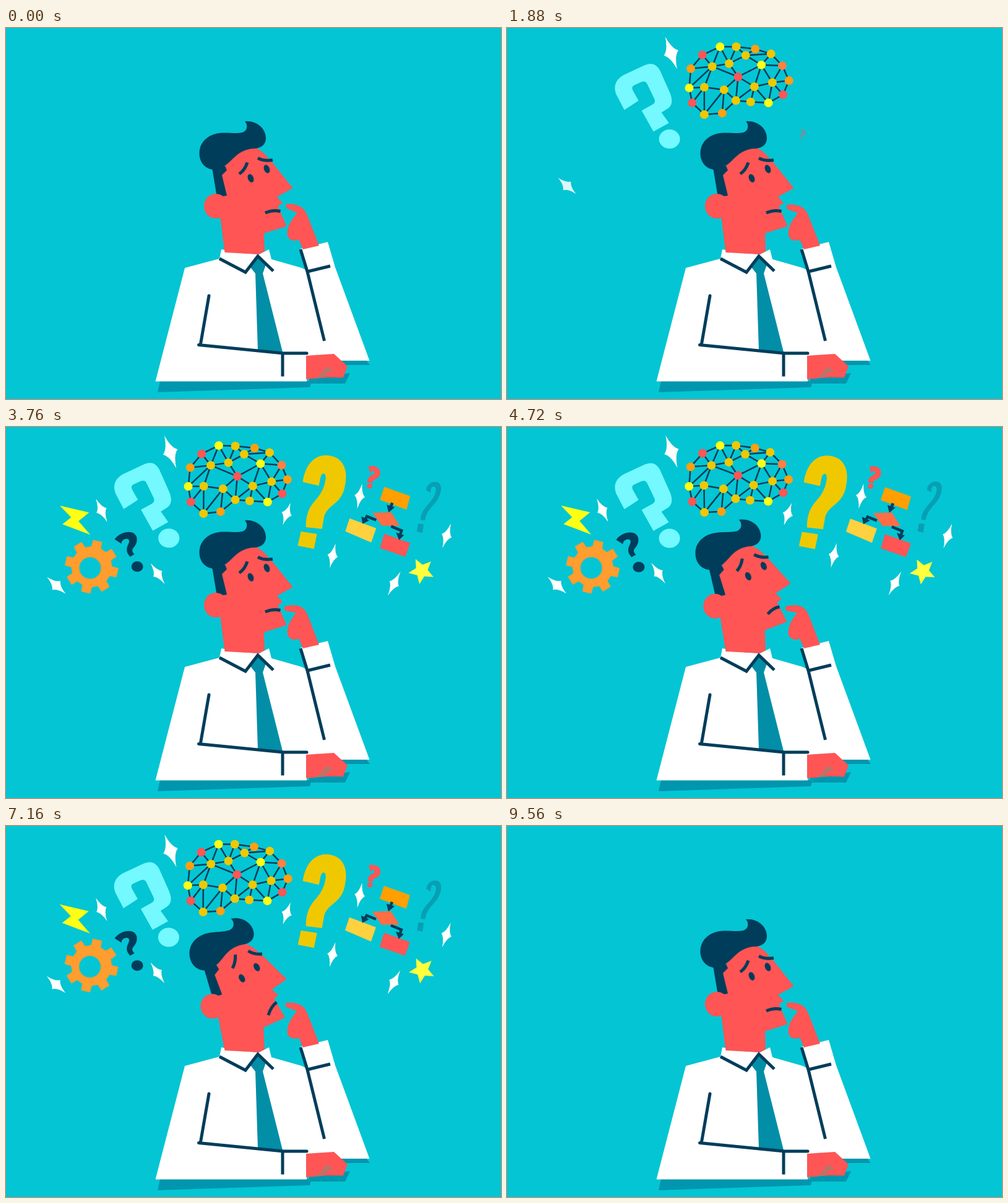
An HTML page for the animation above (9600 ms loop, 800 px wide and 600 px high).

```html
<!DOCTYPE html>
<html lang="en">
<head>
<meta charset="utf-8">
<title>Thinking man</title>
<style>
html, body { margin: 0; width: 100%; height: 100%; overflow: hidden; background: #04c5d3; }
svg { display: block; width: 100vw; height: 100vh; }
</style>
</head>
<body>
<svg viewBox="0 0 800 600" xmlns="http://www.w3.org/2000/svg">
  <rect width="800" height="600" fill="#04c5d3"/>
  <g id="ideas"></g>

  <g fill="#0096ae">
    <path d="M249 571H493V574L491 581L245 589Z"/>
    <path d="M490 567L556 558L548 575H490Z"/>
    <path d="M538 537H582L588 545H546Z"/>
  </g>
  <path fill="#fff" d="M241.500 571.500L289 388L345 373L348 358L380 364L409 366L425 358L429 374L478 388L484 391L476 357L520 346L532 387L587.500 538H540L486 540V571.500Z"/>
  <path fill="#028ea7" d="M407 371L421 380L415 397L447.500 526L407 521.500L403 397L395 387Z"/>
  <path id="neck" fill="#ff5555"/>

  <g id="head">
    <path fill="#ff5555" d="M346 306L349 236L354 226L358 202L400 184L407 196C415 199 421 207 430 217L463.500 259L438 273L447 283L439.500 288L453.500 320.500L417 332L380 345Z"/>
    <path fill="#003d5b" d="M333 226L354 223L357 230L349 238L357 271L341 274Z"/>
    <ellipse cx="339" cy="288" rx="19" ry="20" fill="#ff5555"/>
    <path fill="#003d5b" d="M386 151C404 149 420 162 420 178C420 190 410 195 400 195C385 196 376 202 366 212C356 222 346 230 334 229C320 227 312 215 312.500 202C313 182 330 170 350 169.500C362 169 372 171 382 169C391 166 391 156 386 151Z"/>
    <g id="eyes" fill="#003d5b">
      <ellipse rx="4.500" ry="7" transform="translate(395.500 243) rotate(-22)"/>
      <ellipse rx="4.500" ry="7" transform="translate(421.500 228) rotate(-22)"/>
    </g>
  </g>
  <path id="face" fill="none" stroke="#003d5b" stroke-width="5"/>

  <g fill="none" stroke="#003d5b" stroke-width="5">
    <path d="M345 373L387 395L407 369L432 393"/>
    <path d="M476 358L487 394L514.500 506M487 394L524 385"/>
    <path d="M447 526V563.500"/>
    <path stroke-linecap="round" d="M328 433L314.500 511M311.500 512.500L448 526H486"/>
  </g>
  <path id="hand" fill="#ff5555"/>
  <path fill="#ff5555" d="M485 530L530 527L552 547L545 565.500L521 565L485 568Z"/>
  <path fill="#b4766c" d="M499 566.500L508 561C513 556 515 548 521 548L529 556L520 556L515 563L506 566Z"/>
</svg>
<script>
const LOOP = 9600, STEP = 40, POP = 440;
const NAVY = '#003d5b', RED = '#ff5555', GOLD = '#f0c800', ORANGE = '#ff9d2e', LEMON = '#ffff14';
const AQUA = '#73f9ff', TEAL = '#079fb4';
const HUB = [390, 240], PIVOT = [365, 335], TILT = -7;
const $ = id => document.getElementById(id);
const clamp = x => Math.max(0, Math.min(1, x));
const smooth = x => x * x * (3 - 2 * x);
const ramp = (t, from, span) => clamp((t - from) / span);
const rad = a => a * Math.PI / 180;
const polar = (x, y, r, a) => [x + r * Math.cos(rad(a)), y + r * Math.sin(rad(a))];
const shape = (d, fill) => `<path d="${d}" fill="${fill}"/>`;
const poly = (pts, fill) => `<polygon points="${pts}" fill="${fill}"/>`;
const dot = (x, y, rx, ry, fill) => `<ellipse cx="${x}" cy="${y}" rx="${rx}" ry="${ry}" fill="${fill}"/>`;

// Blend two paths that share the same structure.
function mix(a, b, k) {
  const to = b.match(/-?[\d.]+/g);
  let i = 0;
  return a.replace(/-?[\d.]+/g, n => (+n + (to[i++] - n) * k).toFixed(2));
}

function sparkle(x, y, long, wide, turn) {
  const w = wide * .26, l = long * .22;
  return `<path transform="translate(${x} ${y}) rotate(${turn})" fill="#fff"
    d="M0 ${-long}Q${w} ${-l} ${wide} 0Q${w} ${l} 0 ${long}Q${-w} ${l} ${-wide} 0Q${-w} ${-l} 0 ${-long}Z"/>`;
}

function gear(x, y) {
  const pts = [];
  for (let i = 0; i < 8; i++) {
    const a = -77 + i * 45;
    pts.push(polar(x, y, 33, a - 14), polar(x, y, 43.5, a - 10), polar(x, y, 43.5, a + 10), polar(x, y, 33, a + 14));
  }
  const hole = 'M118.500 228a17.500 17.500 0 1 0 35 0a17.500 17.500 0 1 0 -35 0Z';
  return `<path fill="${ORANGE}" fill-rule="evenodd" d="M${pts.join('L')}Z${hole}"/>`;
}

function star(x, y) {
  const pts = [];
  for (let i = 0; i < 10; i++) pts.push(polar(x, y, i % 2 ? 10 : 21.5, -117 + i * 36));
  return poly(pts.join(' '), '#ffff3c');
}

const chart = poly('611,97 653,112 647,134 604,118', '#ffa000')
  + poly('555,148 598,164 590,187 548,169', '#ffd13f')
  + poly('611,173 653,188 645,210 604,196', RED)
  + poly('592,139 622,138 636,160 607,160', '#ff6d45')
  + `<path fill="none" stroke="${NAVY}" stroke-width="4.500" d="M624 123L621 131M598 151L583 145L580 150M622 161L639 168L637 174"/>`
  + shape('M615 126L628 130L618 138.500ZM574 145L587 151L576 157ZM630 171L643 175L635 183Z', NAVY);

const bigQ = shape('M190 133L177 108C171 93 178 82 190 76L222 61C235 55 243 60 248 70L264 106C269 119 267 127 258 132L250 137L262 154L237 168L218 134L236 124C240 121 240 118 238 114L227 91C225 87 222 86 217 88L206 93C202 95 202 98 204 102L213 118Z', AQUA)
  + dot(263, 180, 17, 15.5, AQUA);
const goldQ = shape('M480 89C484 60 500 44 521 46C543 48 553 66 549 90C547 108 540 117 530 125C520 133 515 139 514 148L511 165L485 162C485 146 488 132 500 119C510 108 515 98 517 84C518 75 513 73 510 78C508 82 508 87 506 95Z', GOLD)
  + poly('477,169 503,173 498,197 472,192', GOLD);
const darkQ = shape('M176 182C184 171 200 167 208 173C215 179 212 190 206 196C203 200 205 203 208 206L201 210C196 205 194 199 197 192C201 185 200 181 195 181C189 182 187 185 187 189Z', NAVY)
  + dot(212.5, 226, 9.5, 8.5, NAVY);
const redQ = shape('M586 64C595 61 605 65 605 74C605 82 598 84 594 86L592 91L584 89C585 81 589 79 593 77C597 75 596 71 593 71C591 71 590 73 589 75Z', RED)
  + dot(588, 95.5, 4.5, 4, RED);
const tealQ = shape('M679 102C680 90 692 86 699 90C706 95 703 108 697 118C690 128 680 134 677 151L670 150C670 136 680 128 688 118C695 108 697 98 692 96C687 95 686 100 686 106Z', TEAL)
  + poly('666,156 675,157 673,171 664,169', TEAL);

// Network: x, y, colour key
const nodes = `316,43,r 344,30,l 370,30,g 401,34,o 426,41,g 445,61,c 455,85,o 446,107,r 422,121,l
  393,119,g 370,117,g 347,137,o 319,139,g 299,121,r 294,96,l 297,65,o 331,62,g 359,57,g 385,44,g
  411,59,l 373,79,r 350,100,g 319,95,g 399,95,g 429,88,g`.split(/\s+/).map(s => s.split(','));
const tint = { r: RED, l: LEMON, g: GOLD, o: '#ffa010', c: '#ff8040' };
const links = nodes.slice(0, 16).map((_, i) => [i, (i + 1) % 16]).concat(
  `16-0 16-1 16-15 16-22 16-17 16-20 16-14 17-1 17-2 17-18 17-20 18-2 18-3 18-19 18-4 19-4 19-5 19-20
   19-24 19-23 20-21 20-23 20-10 21-22 21-10 21-11 21-12 22-14 22-13 22-12 23-24 23-9 23-8 23-10
   24-6 24-5 24-7 24-8`.split(/\s+/).map(s => s.split('-')));
const brain = `<path id="web" fill="none" stroke="${NAVY}" stroke-width="2.500"/>`
  + nodes.map(n => `<circle class="node" r="7" fill="${tint[n[2]]}"/>`).join('');

// Art, time it pops out, time it is pulled back
const ideas = [
  [brain, 1040, 8300], [bigQ, 1160, 8275], [goldQ, 1960, 8128], [gear(138.5, 226), 2040, 8162],
  [darkQ, 2160, 7960], [shape('M87 127L134 138L117 152L136 174L91 157L105 146Z', LEMON), 2280, 8300],
  [chart, 2120, 7900], [redQ, 1680, 7900], [tealQ, 2360, 7960], [star(672, 233), 2560, 7760],
  [sparkle(265.5, 40, 28, 12.5, -20), 1280, 7960], [sparkle(154, 135, 21, 9, -26), 2440, 7720],
  [sparkle(81, 256, 20.5, 10, -48), 1500, 7440], [sparkle(245, 237, 20.5, 8.5, -34), 2600, 7640],
  [sparkle(454, 141, 19, 8.5, 19), 2320, 7680], [sparkle(528, 208, 20.5, 8.5, 13), 2480, 7600],
  [sparkle(572, 112, 20.5, 8.5, 11), 2640, 7560], [sparkle(712, 176, 21, 8.5, 19), 3040, 7440],
  [sparkle(627, 253, 22, 8.5, 28), 2840, 7520]
];
$('ideas').innerHTML = ideas.map(i => `<g class="idea">${i[0]}</g>`).join('');
const groups = document.querySelectorAll('.idea'), discs = document.querySelectorAll('.node');

const FACE_A = 'M419 299Q431 293.500 443.500 296.500M377 236Q386 230 390 217.500M407 210.500Q418 216 431 213.500';
const FACE_B = 'M424 306Q428 292 437.500 285M366 230Q371.500 220 370.500 208M391.500 202Q400 208 414 207';
const WRIST = 'M480 358L473 342C464 347 454 341 454.500 332C455 320 460 312 ';
const HAND_A = WRIST + '470.500 299C466 297 462 295 457 293C450 291 451 283 458 284.500C468 285 481 287 487 303L506 352Z';
const HAND_B = WRIST + '464 305C458 307 452 309 447 312C441 315 440 306 446 302C460 293 480 285 490 309L506 352Z';

function sway(t, seed, size) {
  const w = 2 * Math.PI * t / LOOP;
  return [size * Math.sin(w * (6 + seed % 4) + seed * 2.1), size * Math.cos(w * (5 + seed % 3) + seed * 1.7)];
}

function turned(x, y, angle) {
  const c = Math.cos(rad(angle)), s = Math.sin(rad(angle));
  const dx = x - PIVOT[0], dy = y - PIVOT[1];
  return [PIVOT[0] + dx * c - dy * s, PIVOT[1] + dx * s + dy * c];
}

function draw(t) {
  ideas.forEach(([, start, end], i) => {
    const u = ramp(t, start, POP) - ramp(t, end, POP), f = smooth(clamp(u));
    const [dx, dy] = sway(t, i, .4), g = groups[i];
    g.setAttribute('display', u > .01 ? 'inline' : 'none');
    g.setAttribute('opacity', u);
    g.setAttribute('transform', `translate(${HUB[0] + dx} ${HUB[1] + dy}) scale(${f}) translate(${-HUB[0]} ${-HUB[1]})`);
  });

  const at = nodes.map(([x, y], i) => {
    const [dx, dy] = sway(t, i + 3, .5);
    return [+x + dx, +y + dy];
  });
  at.forEach(([x, y], i) => {
    discs[i].setAttribute('cx', x);
    discs[i].setAttribute('cy', y);
  });
  $('web').setAttribute('d', links.map(([a, b]) => `M${at[a]}L${at[b]}`).join(''));

  const back = smooth(ramp(t, 8500, 460));
  const k = smooth(ramp(t, 4480, 480)) - back, angle = TILT * k;
  const look = smooth(ramp(t, 6280, 240)) - back;
  $('head').setAttribute('transform', `rotate(${angle} ${PIVOT})`);
  $('eyes').setAttribute('transform', `translate(${-3.5 * look} ${6 * look})`);
  $('face').setAttribute('d', mix(FACE_A, FACE_B, k));
  $('neck').setAttribute('d', `M${turned(346, 304, angle)}L${turned(417, 331, angle)}L418 361L409 366L353.500 363Z`);

  const tap = (1 - Math.cos(2 * Math.PI * t / 480)) / 2;
  $('hand').setAttribute('d', mix(HAND_A, HAND_B, tap));
}

const begin = performance.now();
function tick() {
  const t = (performance.now() - begin) % LOOP;
  draw(Math.floor(t / STEP) * STEP);
  requestAnimationFrame(tick);
}
tick();
</script>
</body>
</html>
```
